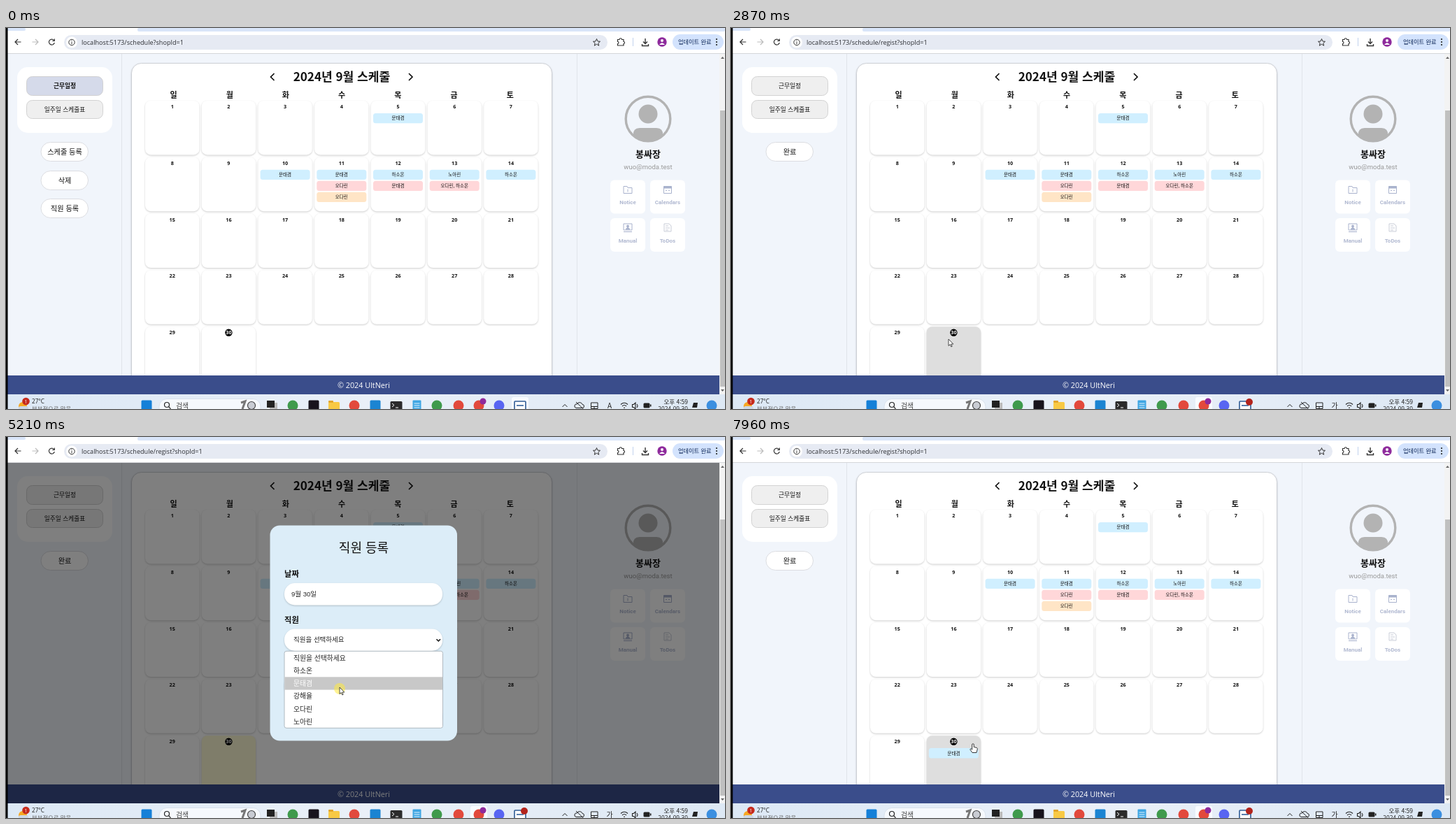
Animation, 1028 px wide and 545 px high, one loop 8000 ms. Source, as an HTML page:

```html
<!DOCTYPE html>
<html lang="ko">
<head>
<meta charset="utf-8">
<style>
  html, body { margin: 0; width: 100%; height: 100%; overflow: hidden; background: #fff; }
  svg { display: block; width: 100vw; height: 100vh; }
  text { font-family: "Open Sans", "Noto Sans CJK KR", "Noto Sans CJK", sans-serif; white-space: pre; }
  .ko { font-family: "Noto Sans CJK KR", "Noto Sans CJK", sans-serif; }
  .ro { font-family: Roboto, sans-serif; }
  .ar { font-family: "Liberation Sans", "Noto Sans CJK KR", sans-serif; }
  .mid { text-anchor: middle; }
  .b { font-weight: 700; }
  .low { filter: drop-shadow(0 1.5px 1px rgba(0,0,0,.2)); }
  .soft { filter: drop-shadow(0 1px 3px rgba(0,0,0,.3)); }
</style>
</head>
<body>
<svg id="stage" viewBox="0 0 1028 545" preserveAspectRatio="none"></svg>
<script>
const LOOP = 8000;
const OPEN = 2930, CLOSE = 6430, ALERT = 6500, ALERT_END = 7340, REGIST = 1230;
const LIST = 3960, PICK = 5260;
const staff = ['하소온', '문태겸', '강해율', '오다린', '노아린'];
const [HA, MUN, , OH, NO] = staff;
const PROMPT = '직원을 선택하세요';

// markup helpers; text y is the visual centre of the line
const rect = (x, y, w, h, r, fill, more = '') =>
  `<rect x="${x}" y="${y}" width="${w}" height="${h}" rx="${r}" fill="${fill}" ${more}/>`;
const circle = (x, y, r, fill, more = '') => `<circle cx="${x}" cy="${y}" r="${r}" fill="${fill}" ${more}/>`;
const line = (d, color = '#333', w = 1.2, more = '') =>
  `<path d="${d}" fill="none" stroke="${color}" stroke-width="${w}" ${more}/>`;
const text = (x, y, size, str, cls = 'ko', fill = '#111', id = '') =>
  `<text x="${x}" y="${y + size * .36}" font-size="${size}" class="${cls}" fill="${fill}" ${id && `id="${id}"`}>${str}</text>`;
const group = (id, body) => `<g id="${id}">${body}</g>`;

function browser() {
  return rect(0, 0, 1028, 37, 0, '#fff') + rect(188, 0, 840, 5, 2, '#d9e5f9') + rect(0, 0, 28, 4, 2, '#d9e5f9') +
    line('M21.500 20H13.500M17 16L13 20L17 24') +
    line('M37.500 20H45.500M42 16L46 20L42 24', '#bbb') +
    line('M68.500 17.500A4 4 0 1 0 69.300 21M69.300 15.500V18.500H66.300') +
    rect(83, 10, 777, 21, 10.5, '#e6eaf3') + circle(94, 20.5, 8, '#fff') +
    circle(94, 20.5, 4.2, 'none', 'stroke="#333"') + line('M94 20V23M94 18V19', '#333', 1) +
    text(108, 20.5, 9.1, '', '', '#2c2e33', 'url') +
    line('M844.500 15.500L846 19L849.500 19.300L846.800 21.700L847.700 25.200L844.500 23.200L841.300 25.200L842.200 21.700L839.500 19.300L843 19Z', '#333', 1) +
    line('M874.500 16.500H877A1.500 1.500 0 0 1 880.500 16.500H883V19.500A1.500 1.500 0 0 1 883 22.500V25H874.500V22.500A1.500 1.500 0 0 0 874.500 19.500Z') +
    line('M896.500 14V26', '#c9d7ef') +
    line('M914 15V22M911 19.500L914 22.500L917 19.500M909.500 23V25.500H918.500V23', '#333', 1.4) +
    circle(938, 20, 6.7, '#8e2a9c') + circle(938, 18, 2, '#fff') + '<path d="M934 24Q938 18.500 942 24Z" fill="#fff"/>' +
    rect(953, 9, 73, 22, 11, '#d3e3fd') + text(961, 20, 8.2, '업데이트 완료', 'ko', '#0b2455') +
    [16, 20, 24].map(y => circle(1016, y, 1.1, '#222')).join('') + rect(0, 36, 1028, 1, 0, '#d4d6da');
}

const menu = (y, h, label, id) =>
  rect(29.5, y, 109, h, 8, '#efefef', `stroke="#cfcfcf" stroke-width=".9" id="${id}"`) +
  text(84, y + h / 2, 8.7, label, 'ko mid', '#111', id + 'T');
const pill = (y, label) =>
  rect(50, y, 67.5, 27, 13.5, '#fff', 'stroke="#d8dade" stroke-width=".9"') +
  text(84, y + 13.5, 10.2, label, 'ko mid');

function sides() {
  const tile = (x, y, label, icon) => rect(x, y, 50, 48, 6, '#fff') +
    text(x + 25, y + 32, 8, label, 'ro mid b', '#b1b9d1') +
    `<g transform="translate(${x + 25} ${y + 14})" fill="none" stroke="#a9b2cd">${icon}</g>`;
  return rect(165, 37, 1, 460, 0, '#e0e4ea') + rect(816, 37, 1, 460, 0, '#e0e4ea') +
    rect(16, 56, 136, 94, 15, '#fff') + menu(69.5, 27, '근무일정', 'work') + menu(103.5, 26, '일주일 스케줄표', 'week') +
    group('before', pill(163.5, '스케줄 등록') + pill(204.5, '삭제') + pill(244.5, '직원 등록')) +
    group('after', pill(163.5, '완료')) +
    circle(918, 130, 31.8, 'none', 'stroke="#b3b3b3" stroke-width="3.4"') + circle(918, 123, 13.5, '#b3b3b3') +
    '<path d="M897 153Q896 143.500 906 143H930Q940 143.500 939 153Q930 161 918 161T897 153Z" fill="#b3b3b3"/>' +
    text(918, 180.5, 13, '봉싸장', 'ko mid b') + text(918, 198.5, 9.5, 'wuo@moda.test', 'ro mid', '#999') +
    tile(864, 217.5, 'Notice', '<path d="M-6 5V-5H-1L0 -3H6V5ZM0 -1V3"/>') +
    tile(921, 217.5, 'Calendars', '<path d="M-5.500 5V-5H5.500V5Z"/><path d="M-5.500 -3.500H5.500" stroke-width="3"/><path d="M-3 1H-1M1 1H3"/>') +
    tile(864, 272, 'Manual', '<path d="M-6 3V-6H6V3ZM-6 5.500H6"/><path d="M-3 2Q0 -3 3 2Z" fill="#a9b2cd"/><circle cy="-2.500" r="1.500" fill="#a9b2cd"/>') +
    tile(921, 272, 'ToDos', '<path d="M-5 5V-6H2L5 -3V5ZM-3 -3H1M-3 0H3M-3 3H1" stroke="#c9cdd8"/>');
}

const cellX = i => 199 + 80.7 * i, cellY = r => 104 + 80.8 * r;
const chipColor = { b: '#d0efff', p: '#ffd7d9', o: '#ffe5c6' };
function chip(day, slot, kind, name) {
  const x = cellX((day - 1) % 7) + 3.2, y = cellY(Math.floor((day - 1) / 7)) + 17.9 + 16 * slot;
  return rect(x, y, 71, 14.4, 3.5, chipColor[kind]) + text(x + 35.5, y + 7.2, 6.5, name, 'ko mid');
}

function calendar() {
  let out = rect(179.5, 50.5, 601, 470, 14, '#fff', 'stroke="#c9ccd2" stroke-width=".9" class="low"') +
    line('M383.500 65L378.500 70L383.500 75M576 65L581 70L576 75', '#111', 1.7) +
    text(480, 70, 17.1, '2024년 9월 스케줄', 'ko mid b');
  [...'일월화수목금토'].forEach((d, i) => out += text(239.5 + 80.2 * i, 96.5, 11, d, 'ko mid b'));
  for (let d = 1; d <= 30; d++) {
    const x = cellX((d - 1) % 7), y = cellY(Math.floor((d - 1) / 7));
    out += rect(x, y, 77.4, 77.4, 8, '#fff', `id="c${d}" class="low"`);
    if (d == 30) out += circle(x + 38.7, y + 8.5, 5.2, '#000');
    out += text(x + 38.7, y + 8.5, 7.2, d, 'mid b', d == 30 ? '#fff' : '#111');
  }
  return out + chip(5, 0, 'b', MUN) + chip(10, 0, 'b', MUN) +
    chip(11, 0, 'b', MUN) + chip(11, 1, 'p', OH) + chip(11, 2, 'o', OH) +
    chip(12, 0, 'b', HA) + chip(12, 1, 'p', MUN) + chip(13, 0, 'b', NO) +
    chip(13, 1, 'p', OH + ', ' + HA) + chip(14, 0, 'b', HA) + group('added', chip(30, 0, 'b', MUN));
}

function modal() {
  const field = (y, label, value, x, id, cls = 'ar') => text(398, y - 12.8, 11.3, label, 'ko b') +
    rect(398, y, 226, 31.5, 15, '#fff', 'class="low"') + text(x, y + 15.5, 9.5, value, cls, '#222', id);
  const caret = y => line(`M615.500 ${y - 1.3}L618.300 ${y + 1.5}L621 ${y - 1.3}`, '#111', 1.5);
  return rect(2, 36, 1018, 488, 0, '#000', 'opacity=".5"') + rect(377.5, 126.5, 267.500, 308, 14, '#dcedf8') +
    text(511.5, 158.5, 18, '직원 등록', 'ko mid') +
    field(209, '날짜', '9월 30일', 408, 'date') + field(274.5, '직원', PROMPT, 411, 'who', 'ko') +
    field(340, '시간대', '1T (09:00 ~ 14:00)', 411, 'slot') + caret(290.5) + caret(356) +
    rect(398, 386, 101, 29, 14, '#efefef') + text(448.5, 400.5, 12.6, '취소', 'ko mid') +
    rect(523, 386, 102, 29, 14, '#3479e9') + text(574, 400.5, 12.6, '등록', 'ko mid b', '#fff') +
    group('list', rect(398, 306.3, 226.5, 110, 3, '#fff', 'stroke="#a9b3ba" stroke-width=".9"') +
      rect(398.5, 306.8, 225.5, 18.3, 0, '#c8c8c8', 'id="mark"') +
      [PROMPT, ...staff].map((s, i) => text(411, 316 + 18.25 * i, 9.8, s, 'ko', '#222', 'o' + i)).join(''));
}

const notice = () => rect(366.5, 34, 300, 98, 8, '#fdfaff', 'class="soft"') +
  text(380, 56, 10.5, 'localhost:5173 내용:', '', '#222') +
  text(380, 75.5, 9, '직원이 성공적으로 등록되었습니다.', 'ko', '#222') +
  rect(608.800, 91.300, 46.4, 28.4, 14.2, '#fff', 'stroke="#36558c" stroke-width="1.6"') +
  rect(611, 93.500, 42, 24, 12, '#36558c') + text(632, 105.5, 8.8, '확인', 'ko mid', '#fff');

function taskbar() {
  const dot = (x, c) => circle(x, 540, 7.5, c), box = (x, c) => rect(x - 7.5, 532.500, 15, 15, 1.5, c);
  return rect(0, 524, 1028, 21, 0, 'url(#bar)') +
    circle(24, 541, 6, '#f7a823') + rect(18, 541, 14, 6, 3, '#cdd8e6') + circle(28.5, 534, 5.3, '#c62b1d') +
    text(28.5, 534, 7, '1', 'mid', '#fff') + text(37, 534.5, 8.2, '27°C', '', '#222') +
    text(37, 545, 8.4, '부분적으로 맑음', 'ko', '#666') +
    box(201, '#1580d8') + rect(219, 530.500, 145, 24, 11, '#f6f9fd', 'stroke="#d3dce8" stroke-width=".8"') +
    circle(230, 539, 3.5, 'none', 'stroke="#222" stroke-width="1.2"') + line('M232.500 541.500L235.500 545') +
    text(243, 540, 9.9, '검색', 'ko', '#444') +
    line('M336 536L342 534L338 545', '#777', 3) + circle(351, 540, 5.5, '#c9ccd3', 'stroke="#444" stroke-width="1.2"') +
    rect(664, 528, 24, 20, 3, '#f8fbff', 'id="focus"') +
    rect(377, 536, 11, 10, 0, '#bbb') + rect(373, 533, 11, 10, 0, '#222') +
    dot(410, '#3f9a4c') + box(440, '#17131c') + rect(461, 535, 16, 12, 1.5, '#f8c944') + rect(461, 533, 7, 3, 1, '#e3a52b') +
    dot(498, '#e2493c') + box(528, '#1b84d2') + rect(549.500, 534, 17, 13, 1.5, '#2b2b2b') +
    line('M552 537L555 539.500L552 542M557 543H561', '#fff', 1) + rect(581.500, 532.500, 12, 14, 1, '#3fa6e3') +
    line('M583.500 537H591.500M583.500 540H591.500M583.500 543H591.500', '#e4f4ff', 1) +
    dot(616, '#3f9a4c') + dot(647, '#e2493c') + dot(676, '#e2493c') + circle(682, 534, 4.500, '#8e2a9c') +
    dot(705, '#5865f2') + rect(727, 534, 16, 12, 1, '#fff', 'stroke="#2f5b94" stroke-width="1.6"') +
    rect(730, 539, 10, 2, 0, '#5a7fae') + circle(741, 535, 5, '#b3241c', 'id="rec"') +
    line('M795.500 542L799 538.500L802.500 542M815 543.500H824A2.500 2.500 0 0 0 824 538.500A4 4 0 0 0 816.500 538A2.800 2.800 0 0 0 815 543.500M815 535L825.500 545M836.500 536H846V544.500H836.500ZM836.500 541.500H846M841 541.500V544.500', '#222', 1) +
    text(863, 540, 10, '', 'ko mid', '#222', 'ime') +
    line('M879 538.500Q884 534 889 538.500M881 541Q884 538 887 541M883 543.200L885 543.200M895.500 538.500H897.500L900 536V545L897.500 542.500H895.500ZM902 538Q904 540.500 902 543', '#222', 1.1) +
    rect(911.500, 536.500, 9, 7, 1.5, '#222') + rect(921, 538.500, 1.500, 3, 0, '#222') +
    `<g text-anchor="end">${text(975, 534.5, 8.5, '오후 4:59', 'ko', '#222') + text(975, 545, 8.2, '2024-09-30', '', '#222')}</g>` +
    '<path d="M981 543L983 536H989L988 543Z" fill="#222"/>' + circle(1009, 540, 7.5, '#3b8fe0');
}

const scrollbar = () => rect(1020, 37, 8, 487, 0, '#f3f3f3') + rect(1021, 118, 7, 395, 0, '#c0c0c0') +
  '<path d="M1022 44L1024.500 41L1027 44ZM1022 517L1024.500 520L1027 517Z" fill="#666"/>';

const stage = document.getElementById('stage');
stage.innerHTML = '<linearGradient id="bar"><stop stop-color="#dce8f5"/><stop offset=".5" stop-color="#eaf0f8"/><stop offset="1" stop-color="#dde8f4"/></linearGradient>' +
  rect(0, 0, 1028, 545, 0, '#f1f5fb') + sides() + calendar() +
  rect(2, 497, 1018, 27, 0, '#3a4d8b') + text(511.5, 511.5, 10.8, '© 2024 UltNeri', 'mid', '#fff') +
  scrollbar() + group('modal', modal()) + browser() + group('alert', notice()) + taskbar() +
  rect(0, 0, 2.5, 545, 0, '#000') +
  group('pointer', circle(0, 2, 8, '#ffe93c', 'opacity=".55" id="click"') +
    '<path id="arrow" d="M0 0V9.600L2.200 7.600L3.800 11L5.200 10.400L3.700 7.100H6.800Z" fill="#fff" stroke="#222" stroke-width=".8"/>' +
    '<path id="hand" d="M-1.300 .5Q0 -1 1.300 .5V4.500L5.500 5.500Q6.600 6 6.200 8L5 12.500H-1L-4 8.300Q-4 6.500 -2.600 7L-1.300 8.200Z" fill="#fff" stroke="#222" stroke-width=".9"/>');

const el = {};
stage.querySelectorAll('[id]').forEach(n => el[n.id] = n);
const show = (id, on) => el[id].style.display = on ? '' : 'none';
const paint = (id, fill) => el[id].setAttribute('fill', fill);

// pointer way points: time, x, y; a repeated place is a rest
const path = [
  [0, 1010, 549], [70, 1010, 549], [810, 84, 186], [1160, 84, 186], [1300, 86, 255], [1430, 92, 258], [1690, 92, 258],
  [2000, 208, 258], [2250, 270, 350], [2530, 311, 445], [3130, 311, 445], [3600, 465, 258], [3890, 478, 290],
  [3960, 478, 290], [4170, 480, 327], [4760, 473, 352], [4890, 473, 352], [4960, 477, 358], [5210, 477, 358],
  [5490, 488, 405], [5690, 488, 405], [6100, 603, 403], [6500, 603, 403], [6700, 439, 416], [7180, 632, 106],
  [7340, 632, 106], [7960, 346, 439], [LOOP, 346, 439]];
const same = (a, b) => !a || !b || (a[1] == b[1] && a[2] == b[2]);
function slope(i, k) {
  const a = path[i - 1], p = path[i], b = path[i + 1];
  return same(a, p) || same(p, b) ? 0 : (b[k] - a[k]) / (b[0] - a[0]);
}
function place(t) {
  const i = Math.max(0, path.findIndex(p => p[0] > t) - 1), a = path[i], b = path[i + 1];
  const d = b[0] - a[0], u = (t - a[0]) / d, s = u * u * (3 - 2 * u);
  return [1, 2].map(k => a[k] + (b[k] - a[k]) * s +
    d * (slope(i, k) * u * (1 - u) ** 2 - slope(i + 1, k) * u * u * (1 - u)));
}
const within = ([x, y], l, t, r, b) => x >= l && x <= r && y >= t && y <= b;
function dayAt(p) {
  if (!within(p, 198, 103, 762, 497)) return 0;
  const d = Math.floor((p[0] - 198) / 80.7) + 1 + 7 * Math.floor((p[1] - 103) / 80.8);
  return d <= 30 ? d : 0;
}
const clicks = [[1160, 1230], [2800, 2865], [3890, 3960], [5210, 5260], [6200, 6360], [7270, 7340]];

function draw(t) {
  const pos = place(t), regist = t >= REGIST, open = t >= OPEN && t < CLOSE, alert = t >= ALERT && t < ALERT_END;
  const done = t >= CLOSE;
  // the page keeps its last hover while the notice blocks it
  const hover = open ? 0 : dayAt(alert ? place(ALERT) : pos);
  for (let d = 1; d <= 30; d++) paint('c' + d, d == hover ? '#dedede' : d == 30 && t >= OPEN ? '#fffbd6' : '#fff');

  show('before', !regist); show('after', regist);
  show('modal', open); show('alert', alert); show('added', done);
  paint('work', regist ? '#efefef' : '#d5daea');
  el.workT.style.fontWeight = regist ? 400 : 700;
  el.url.textContent = `localhost:5173/schedule${regist ? '/regist' : ''}?shopId=1`;
  el.ime.textContent = regist ? '가' : 'A';
  el.focus.setAttribute('x', regist ? 664 : 723);
  show('rec', t >= 200);

  show('list', t >= LIST && t < PICK);
  el.who.textContent = t >= PICK ? MUN : PROMPT;
  const row = Math.max(0, Math.min(5, Math.floor((place(Math.max(0, t - 90))[1] - 306.8) / 18.25)));
  el.mark.setAttribute('y', 306.8 + 18.25 * row);
  for (let i = 0; i < 6; i++) paint('o' + i, i == row ? '#fff' : '#222');

  const hand = open ? t >= PICK && (within(pos, 398, 386, 499, 415) || within(pos, 523, 386, 625, 415))
    : alert ? pos[1] > 132
    : done ? hover == 30 || t < ALERT
    : within(pos, 50, 163, 118, 190) || !regist && (within(pos, 50, 204, 118, 231) || within(pos, 50, 245, 118, 272));
  show('hand', hand); show('arrow', !hand);
  show('click', clicks.some(([a, b]) => t >= a && t < b));
  el.pointer.setAttribute('transform', `translate(${pos})`);
}

const start = performance.now();
function tick(now) {
  draw(Math.max(0, now - start) % LOOP);
  requestAnimationFrame(tick);
}
draw(0);
requestAnimationFrame(tick);
</script>
</body>
</html>
```
